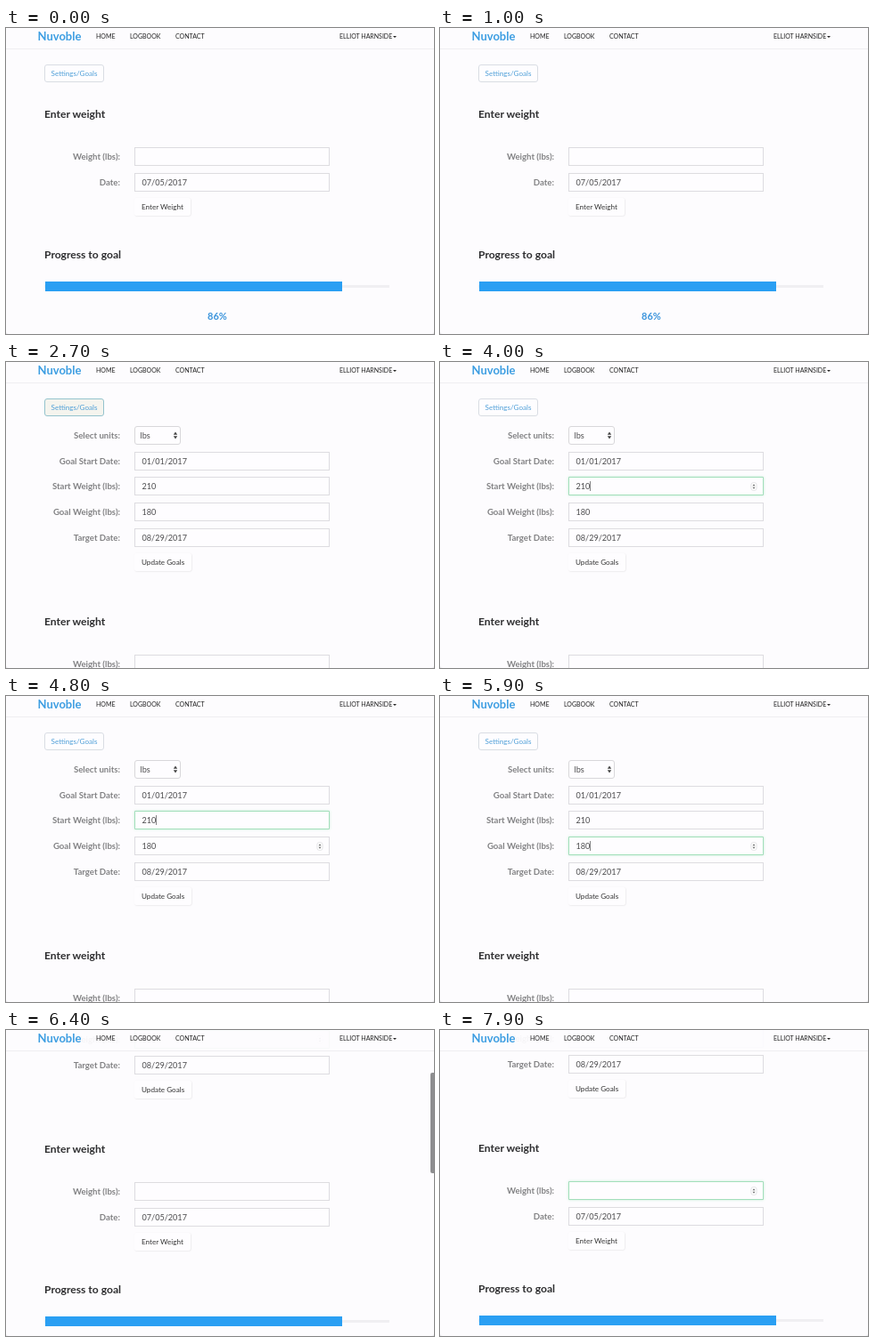
Animation, 480 px wide and 344 px high, one loop 8 s. Source, as an HTML page:

```html
<!DOCTYPE html>
<html lang="en">
<head>
<meta charset="utf-8">
<title>Weight tracker</title>
<style>
  html, body { margin: 0; width: 100%; height: 100%; overflow: hidden; background: #e4e3e7; }
  * { box-sizing: border-box; }
  .stage {
    position: relative; width: 480px; height: 344px; overflow: hidden;
    background: #fdfcfe; border-radius: 0 0 3px 3px;
    font: 9.1px/21px Lato, "Open Sans", sans-serif; color: #333; white-space: nowrap;
  }
  .stage div, .stage nav, .stage nav span, .stage svg { position: absolute; }
  .page, .lower { left: 0; top: 0; width: 480px; }

  /* navigation */
  nav { left: 0; top: 0; width: 480px; height: 24px; background: rgba(253, 252, 254, .94); border-bottom: 1px solid #efeef1; }
  nav span { top: -1px; font-size: 7px; color: #222; }
  nav .brand { left: 35.5px; top: -1.5px; font-size: 13px; font-weight: 700; color: #3d9ee2; }
  .down { left: 434px; top: 8.5px; border: 2.2px solid transparent; border-top: 2.5px solid #222; border-bottom: 0; }

  /* form parts */
  .row { left: 0; top: var(--y); width: 480px; height: 21px; }
  .label { right: 352px; font-size: 9.65px; font-weight: 700; color: #828284; }
  .field { left: 144px; width: 219px; height: 21px; padding-left: 7.5px; line-height: 19px; background: #fefdff; border: 1px solid #dddce0; color: #4c4c4e; }
  .select { width: 52px; padding-left: 5.6px; border-radius: 3px; border-color: #d8d7da; }
  .select svg { left: 42px; top: 5px; }
  .btn { left: 144px; top: var(--y); height: 20px; padding: 0 8px; font-size: 8.15px; line-height: 20px; background: #fefdff; border-radius: 2px; box-shadow: .5px .5px 1.5px rgba(0, 0, 0, .1); }
  .toggle { left: 43px; top: 41px; width: 67px; height: 20px; line-height: 18px; text-align: center; font-size: 8.1px; color: #4f9fd8; background: #fefdff; border: 1px solid #d9dde3; border-radius: 3px; animation: hover 8s infinite; }
  .head { left: 43px; font-size: 12.1px; font-weight: 700; color: #2e2e30; }
  .settings { left: 0; top: 61px; width: 480px; overflow: hidden; animation: open 8s infinite; }
  .lower { animation: push 8s infinite; }

  /* focus state */
  .ring { left: 144px; width: 219px; height: 21px; border: 1px solid #a2dfba; border-radius: 1px; box-shadow: 0 0 3px rgba(110, 215, 150, .4); }
  .spin { left: 348px; top: 6px; }
  .caret { display: inline-block; width: 1px; height: 11px; vertical-align: -2px; background: #858587; }
  .ring, .caret { opacity: 0; animation: var(--focus) 8s infinite; }
  .caret { animation: var(--focus) 8s infinite, blink 1s var(--phase) infinite; }
  .spin { opacity: 0; animation: var(--point) 8s infinite step-end; }
  .start { --focus: focusStart; --point: pointStart; --phase: -200ms; }
  .goal { --focus: focusGoal; --point: pointGoal; --phase: -100ms; }
  .weight { --focus: focusWeight; --point: pointWeight; --phase: -700ms; }

  /* progress */
  .track { left: 43px; top: 289px; width: 387px; height: 3px; background: #f0eff2; }
  .fill { left: 43.5px; top: 284.5px; width: 333px; height: 11.5px; background: #2a9ff3; }
  .value { left: 187px; top: 313px; width: 100px; text-align: center; font-size: 11px; font-weight: 700; color: #3a94dc; }

  .page { animation: scroll 8s infinite; }
  .thumb { right: 0; top: 0; width: 4px; height: 113px; background: #8e8e90; border-radius: 2px 0 0 2px; opacity: 0; animation: thumb 8s infinite, fade 8s infinite; }

  @keyframes hover {
    0%, 23.75%, 40%, 100% { background: #fefdff; border-color: #d9dde3; }
    25%, 38.1% { background: #f5f4ee; border-color: #94c3cd; }
  }
  @keyframes open {
    0%, 26.875% { height: 0; animation-timing-function: ease; }
    31.25%, 100% { height: 195px; }
  }
  @keyframes push {
    0%, 26.875% { transform: none; animation-timing-function: ease; }
    31.25%, 100% { transform: translateY(195px); }
  }
  @keyframes focusStart {
    0%, 47.5%, 63.1%, 100% { opacity: 0; }
    49.3%, 61.25% { opacity: 1; }
  }
  @keyframes focusGoal {
    0%, 61.25%, 93.1%, 100% { opacity: 0; }
    63.1%, 91.25% { opacity: 1; }
  }
  @keyframes focusWeight {
    0%, 91.25% { opacity: 0; }
    93.1%, 100% { opacity: 1; }
  }
  @keyframes pointStart { 0% { opacity: 0; } 42.5% { opacity: 1; } 59.4%, 100% { opacity: 0; } }
  @keyframes pointGoal { 0% { opacity: 0; } 59.4% { opacity: 1; } 88.75%, 100% { opacity: 0; } }
  @keyframes pointWeight { 0% { opacity: 0; } 88.75%, 100% { opacity: 1; } }
  @keyframes blink { 0%, 49.9% { visibility: visible; } 50%, 100% { visibility: hidden; } }
  @keyframes scroll {
    0%, 75% { transform: none; animation-timing-function: cubic-bezier(.3, .3, .4, 1); }
    80% { transform: translateY(-158px); }
    82.5%, 100% { transform: translateY(-159px); }
  }
  @keyframes thumb {
    0%, 75% { transform: none; animation-timing-function: cubic-bezier(.3, .3, .4, 1); }
    80% { transform: translateY(48px); }
    82.5%, 100% { transform: translateY(48.3px); }
  }
  @keyframes fade {
    0%, 74.9%, 93.1%, 100% { opacity: 0; }
    75%, 90% { opacity: 1; }
  }
</style>
</head>
<body>
<svg width="0" height="0" style="position:absolute">
  <symbol id="arrows" viewBox="0 0 6 9"><path d="M3 .6 5.2 3.7H.8zM3 8.4 5.2 5.3H.8z"/></symbol>
  <symbol id="stepper" viewBox="0 0 8 10">
    <rect x=".9" y=".5" width="6.2" height="9" rx="2.6" fill="#fff" stroke="#dcdcde" stroke-width=".7"/>
    <path d="M4 2.2 5.5 4.2h-3zM4 7.8 5.5 5.8h-3z" fill="#6c6c6e"/>
  </symbol>
</svg>
<div class="stage">
  <div class="page">
    <div class="toggle">Settings/Goals</div>
    <div class="settings">
      <div class="row" style="--y:11px"><div class="label">Select units:</div>
        <div class="field select">lbs<svg width="6" height="9" fill="#444"><use href="#arrows"/></svg></div></div>
      <div class="row" style="--y:40px"><div class="label">Goal Start Date:</div><div class="field">01/01/2017</div></div>
      <div class="row start" style="--y:68px"><div class="label">Start Weight (lbs):</div>
        <div class="field">210<i class="caret"></i></div><div class="ring"></div>
        <svg class="spin" width="8" height="10"><use href="#stepper"/></svg></div>
      <div class="row goal" style="--y:97px"><div class="label">Goal Weight (lbs):</div>
        <div class="field">180<i class="caret"></i></div><div class="ring"></div>
        <svg class="spin" width="8" height="10"><use href="#stepper"/></svg></div>
      <div class="row" style="--y:126px"><div class="label">Target Date:</div><div class="field">08/29/2017</div></div>
      <div class="btn" style="--y:154px">Update Goals</div>
    </div>
    <div class="lower">
      <div class="head" style="top:86px">Enter weight</div>
      <div class="row weight" style="--y:134px"><div class="label">Weight (lbs):</div>
        <div class="field"><i class="caret"></i></div><div class="ring"></div>
        <svg class="spin" width="8" height="10"><use href="#stepper"/></svg></div>
      <div class="row" style="--y:163px"><div class="label">Date:</div><div class="field">07/05/2017</div></div>
      <div class="btn" style="--y:191px">Enter Weight</div>
      <div class="head" style="top:244px">Progress to goal</div>
      <div class="track"></div>
      <div class="fill"></div>
      <div class="value">86%</div>
    </div>
  </div>
  <nav>
    <span class="brand">Nuvoble</span>
    <span style="left:101px">HOME</span>
    <span style="left:139px">LOGBOOK</span>
    <span style="left:190px">CONTACT</span>
    <span style="left:374px">ELLIOT HARNSIDE</span>
    <div class="down"></div>
  </nav>
  <div class="thumb"></div>
</div>
</body>
</html>
```
